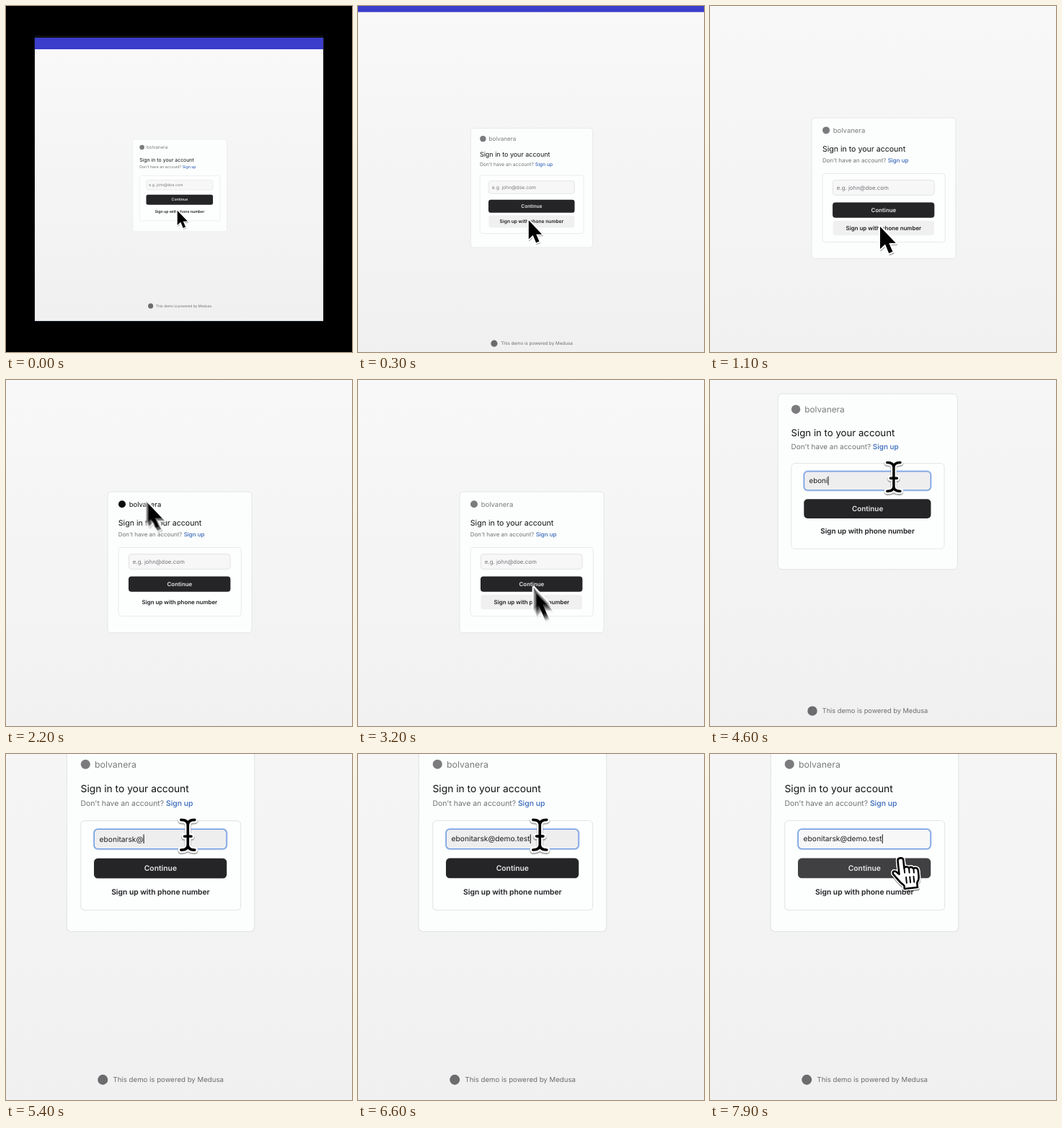
An HTML page that plays this animation: 480x480 px, repeating every 8000 ms.

```html
<!DOCTYPE html>
<html lang="en">
<head>
<meta charset="utf-8">
<title>Sign in demo</title>
<style>
  html, body { margin: 0; width: 100%; height: 100%; overflow: hidden; background: #000; }
  svg { display: block; width: 100vw; height: 100vh; }
  text { font-family: Inter, "Liberation Sans", sans-serif; white-space: pre; text-rendering: geometricPrecision; }
  .strong { font-weight: 600; font-size: 7.92px; text-anchor: middle; }
</style>
</head>
<body>
<svg viewBox="0 0 480 480">
  <defs>
    <linearGradient id="page" x1="0" y1="0" x2="0" y2="1">
      <stop offset="0" stop-color="#f9f9f9"/>
      <stop offset="1" stop-color="#f0f0f1"/>
    </linearGradient>
    <path id="arrowPath" d="M0 0V31L7 24.6L12.2 37L17.4 34.8L12.3 23H21.8Z"/>
    <path id="beamPath" d="M-7.3 -16Q0 -16 0 -10.5Q0 -16 7.3 -16M0 -10.5V10.5M-7.3 16Q0 16 0 10.5Q0 16 7.3 16M-3.6 1.5H3.6"/>
    <path id="handPath" d="M-3 2.5Q-3 0 0 0Q3 0 3 2.5V11Q5.5 8.5 8 11.5Q10.5 9.5 12.8 12.5Q17.5 11 17.5 16V21Q17.5 25 15 28V33H1V29.5Q-3 26 -6 21L-9.5 16Q-10 12.5 -6.5 13.5L-3 17Z"/>
    <g id="arrow" stroke-linejoin="round">
      <use href="#arrowPath" opacity=".2" transform="translate(1 2)" stroke="#000" stroke-width="2"/>
      <use href="#arrowPath" stroke="#fff" stroke-width="4"/>
      <use href="#arrowPath"/>
    </g>
    <g id="beam" fill="none" stroke-linecap="round">
      <use href="#beamPath" opacity=".14" transform="translate(0 1.2)" stroke="#000" stroke-width="7"/>
      <use href="#beamPath" stroke="#fff" stroke-width="6"/>
      <use href="#beamPath" stroke="#000" stroke-width="2.8"/>
    </g>
    <g id="hand" stroke-linejoin="round" stroke-linecap="round">
      <g transform="translate(-.8 -.3) rotate(-6)">
        <use href="#handPath" opacity=".2" transform="translate(0 1.5)" stroke="#000" stroke-width="4"/>
        <use href="#handPath" stroke="#fff" stroke-width="4"/>
        <use href="#handPath" fill="#fff" stroke="#000" stroke-width="2"/>
        <path d="M3 11V16M8 11.5V16.5M12.8 12.5V17M4 21V27M8 21V27M12 21V27" fill="none" stroke="#000" stroke-width="1.5"/>
      </g>
    </g>
  </defs>
  <rect width="480" height="480"/>
  <g id="cam">
    <rect x="-66" y="-64" width="611" height="2" fill="#1b1b1d"/>
    <rect x="-66" y="540" width="611" height="2" fill="#0c1220"/>
    <rect x="-66" y="-60" width="611" height="600" fill="url(#page)"/>
    <rect x="-66" y="-60" width="611" height="24.5" fill="#3b3dcb"/>

    <rect x="141" y="155" width="200" height="195.6" rx="5" fill="#fcfefd" stroke="#e0e3e2" stroke-width=".8"/>
    <g id="logo">
      <circle cx="161" cy="172.3" r="5"/>
      <text x="170.7" y="175.7" font-size="9.5">bolvanera</text>
    </g>
    <text x="155.8" y="202" font-size="10.6" fill="#111113">Sign in to your account</text>
    <text x="155.8" y="216.7" font-size="7.97" fill="#707074">Don't have an account? <tspan fill="#3666ba" font-weight="500">Sign up</tspan></text>

    <rect x="156" y="232.4" width="170.3" height="95.3" rx="4" fill="#fdfefe" stroke="#e2e5e5" stroke-width=".8"/>
    <rect id="ring" x="168.9" y="240.1" width="143.6" height="23.6" rx="5.2" fill="#cfdff7"/>
    <rect id="field" x="170.2" y="241.5" width="141" height="20.9" rx="4" stroke-width="1"/>
    <text id="hint" x="175.8" y="255.2" font-size="7.85" fill="#78787c">e.g. john@doe.com</text>
    <text id="typed" x="175.8" y="254.6" font-size="7.85" fill="#1d1d20"></text>
    <rect id="caret" y="247" width=".8" height="9.6" fill="#111"/>

    <rect id="go" x="170" y="272.4" width="141.4" height="21.3" rx="4"/>
    <text class="strong" x="240.9" y="285.8" fill="#e6e6e7">Continue</text>
    <rect id="alt" x="170.5" y="298" width="140.6" height="20.2" rx="4" fill="#f0f0f1"/>
    <text class="strong" x="240.9" y="310.9" fill="#1f1f22">Sign up with phone number</text>

    <circle cx="179.4" cy="508.2" r="5.4" fill="#6c6c6f"/>
    <text x="190.4" y="510.7" font-size="7.4" fill="#6c6c70">This demo is powered by Medusa</text>
    <g id="pointer"></g>
  </g>
</svg>
<script>
const LOOP = 8;
const EMAIL = 'ebonitarsk@demo.test';
const KEYS = [4.2, 4.3, 4.4, 4.5, 4.6, 4.75, 4.85, 4.95, 5.05, 5.15, 5.4,
              5.7, 5.8, 5.95, 6.05, 6.15, 6.3, 6.4, 6.5, 6.6];
const FOCUS = 3.95;

// time, x, y of the pointer's hot spot
const PATH = [
  [0, 236, 306], [1.3, 236, 306], [1.75, 204, 178], [2.05, 206, 180],
  [2.3, 187.5, 161.5], [2.8, 187.5, 161.5], [3.25, 250, 302], [3.45, 250, 302],
  [3.85, 267.4, 245.5], [4.1, 267.4, 245.5], [4.4, 270, 247.5],
  [7.3, 270, 247.5], [7.65, 279.8, 272.5], [8, 279.8, 272.5]
];

// camera: log of the scale, then where the anchor (241, 308) lands on the stage
const WIDE = [Math.log(0.655), 241, 285];
const MID = [0, 241, 308];
const DIP = [Math.log(0.985), 241, 307.5];
const NEAR = [Math.log(1.303), 214.5, 191];

const $ = id => document.getElementById(id);
const set = (id, name, value) => $(id).setAttribute(name, value);
const show = (id, on) => set(id, 'visibility', on ? 'visible' : 'hidden');
const clamp = v => Math.min(1, Math.max(0, v));
const smooth = u => u * u * (3 - 2 * u);
const mix = (a, b, p) => a.map((v, i) => v + (b[i] - v) * p);

function spring(t) {
  const x = 7.8 * Math.max(0, t);
  return 1 - (1 + x) * Math.exp(-x);
}

function camera(t) {
  if (t < 3.9) return mix(WIDE, MID, spring(t - 0.04));
  return mix(mix(MID, DIP, smooth(clamp((t - 3.9) / 0.2))), NEAR, spring(t - 4.18));
}

function pointerAt(t) {
  t = Math.max(0, t);
  let i = 1;
  while (i < PATH.length - 1 && PATH[i][0] < t) i++;
  const [a, b] = [PATH[i - 1], PATH[i]];
  return mix(a, b, smooth(clamp((t - a[0]) / (b[0] - a[0])))).slice(1);
}

const inside = ([x, y], l, t, r, b) => x >= l && x <= r && y >= t && y <= b;

// stacked copies of the pointer give motion blur
const BLUR = 6;
const copies = Array.from({ length: BLUR }, (_, i) => {
  const use = document.createElementNS('http://www.w3.org/2000/svg', 'use');
  use.setAttribute('opacity', 1 / (i + 1));
  $('pointer').append(use);
  return use;
});

function drawPointer(t, shape) {
  const press = 1 - 0.17 * smooth(clamp((t - 3.9) / 0.12)) * (1 - smooth(clamp((t - 4.12) / 0.2)));
  copies.forEach((use, i) => {
    const [x, y] = pointerAt(t - (BLUR - 1 - i) * 0.008);
    use.setAttribute('href', '#' + shape);
    use.setAttribute('transform', `translate(${x} ${y}) scale(${press})`);
  });
}

function draw(t) {
  const [zoom, x, y] = camera(t);
  set('cam', 'transform', `translate(${x} ${y}) scale(${Math.exp(zoom)}) translate(-241 -308)`);

  const spot = pointerAt(t);
  const onField = inside(spot, 170, 241, 312, 263.5);
  const onGo = inside(spot, 170, 268, 312, 294);
  const focused = t >= FOCUS;

  set('logo', 'fill', inside(spot, 155, 158, 217, 181) ? '#0c0c0e' : '#7b7b7e');
  set('go', 'fill', onGo ? '#404043' : '#252528');
  show('alt', t > 0.15 && inside(spot, 170, 297, 312, 318));
  set('field', 'fill', onField ? '#eeeeef' : '#f7f7f8');
  set('field', 'stroke', focused ? '#6a97e0' : '#e3e3e5');
  show('ring', focused);

  const count = KEYS.filter(k => k <= t).length;
  const typed = $('typed');
  const value = EMAIL.slice(0, count);
  if (typed.textContent !== value) typed.textContent = value;
  show('hint', count === 0);

  const since = t - (count ? KEYS[count - 1] : FOCUS);
  show('caret', focused && since % 1 < 0.5);
  set('caret', 'x', 176 + (count ? typed.getComputedTextLength() : 0));

  drawPointer(t, onField ? 'beam' : onGo ? 'hand' : 'arrow');
}

const start = performance.now();
function tick() {
  draw((performance.now() - start) / 1000 % LOOP);
  requestAnimationFrame(tick);
}
tick();
</script>
</body>
</html>
```
